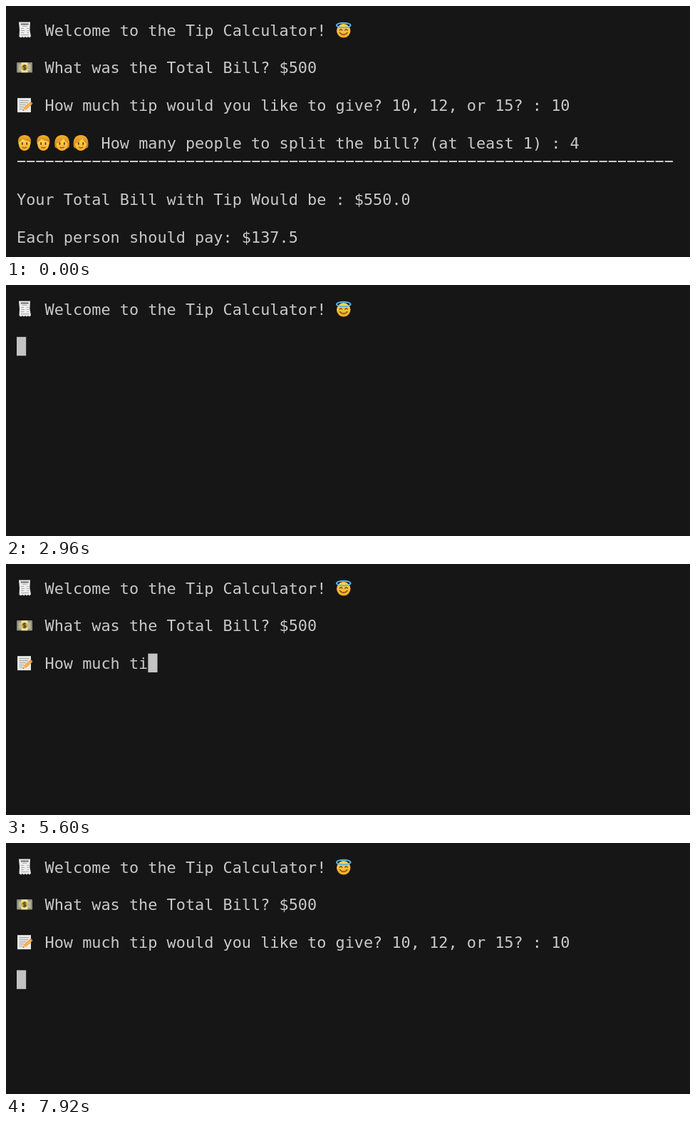
Write an HTML page that moves like this. It is 960 px wide and 352 px high and loops after 8 s.

```html
<!DOCTYPE html>
<html lang="en">
<head>
<meta charset="utf-8">
<title>Tip Calculator</title>
<style>
  html, body { margin: 0; width: 100%; height: 100%; overflow: hidden; background: #161616; }
  svg { display: block; width: 100%; height: 100%; }
  text {
    font: 21.875px "DejaVu Sans Mono", monospace;
    fill: #c9c9c9;
    white-space: pre;
  }
</style>
</head>
<body>
<svg id="stage" viewBox="0 0 960 352" xmlns="http://www.w3.org/2000/svg">
  <defs>
    <linearGradient id="skin" x2="0" y2="1">
      <stop offset="0" stop-color="#ffdc55"/><stop offset="1" stop-color="#f5a623"/>
    </linearGradient>
    <linearGradient id="hair" x2="0" y2="1">
      <stop offset="0" stop-color="#f3b02c"/><stop offset="1" stop-color="#c87a17"/>
    </linearGradient>

    <g id="receipt">
      <path d="M3 0H19L18.4 11 20 20 18 22 16 20.5 14 22 12 20.5 10 22 8 20.5 6 22 3.5 20.5 4 11Z" fill="#ececec"/>
      <path d="M6 3H16.500" stroke="#444" stroke-width="2.200" stroke-dasharray="1.200 .4"/>
      <path d="M8 5.800H14.500M6 9H10M14.500 9H17M6 12H11M14.500 12H17M6 15H10M14.500 15H17M6 18H17" stroke="#aaa"/>
    </g>

    <g id="money">
      <rect x=".3" y="4" width="21.500" height="14" rx=".6" fill="#b9b79b"/>
      <rect x="1.700" y="5.500" width="18.700" height="11" fill="none" stroke="#7d7e66"/>
      <rect x="6.500" y="4" width="9" height="14" fill="#f5e29a"/>
      <circle cx="11" cy="11" r="4.300" fill="#c9a63c"/>
      <path d="M13 9C12 7.800 9 8 9 9.600 9 11.500 13 10.600 13 12.500 13 14 10 14.200 9 13M11 7V15" fill="none" stroke="#4b431f" stroke-width="1.100"/>
    </g>

    <g id="memo">
      <path d="M1 1H20V21H1Z" fill="#e9e9e7"/>
      <path d="M3.500 4.500H17M3.500 7.500H16M3.500 10.500H13M3.500 13.500H10M3.500 16.500H8" stroke="#aaa" stroke-width="1.100"/>
      <path d="M8.500 18.700 10 14.500 18.500 7 21.500 10 13 17.500Z" fill="#f2a02c"/>
      <path d="M11.500 16 20 8.500" stroke="#ffc95c" stroke-width="1.200"/>
      <path d="M18.500 7 20 5.700 22.500 8.700 21.500 10Z" fill="#e2766f"/>
      <path d="M8.500 18.700 10 14.500 13 17.500Z" fill="#e9c596"/>
      <path d="M8.500 18.700 9 17.200 10.200 18.200Z" fill="#333"/>
    </g>

    <g id="angel">
      <circle cx="11" cy="12.300" r="9.700" fill="url(#skin)"/>
      <ellipse cx="11" cy="4.500" rx="9.800" ry="3.300" fill="none" stroke="#58b4e6" stroke-width="2"/>
      <path d="M5.500 11.500Q7.300 9 9 11.500M13 11.500Q14.800 9 16.500 11.500M5.800 15Q11 20.500 16.200 15" fill="none" stroke="#74401b" stroke-width="1.400" stroke-linecap="round"/>
    </g>

    <g id="features">
      <path d="M7.800 11V13M14.200 11V13" stroke="#59351a" stroke-width="1.700" stroke-linecap="round"/>
      <path d="M8 16.800Q11 19 14 16.800" fill="none" stroke="#9b4b20" stroke-width="1.300"/>
    </g>
    <g id="boy">
      <path d="M2.500 13C0 3 6 0 11 0S22 3 19.500 13Z" fill="url(#hair)"/>
      <path d="M3 10C6 9 7 7 8 5.500 11 8 16 8 19 10 20 17 16 22 11 22S2 17 3 10Z" fill="url(#skin)"/>
      <use href="#features"/>
    </g>
    <g id="girl">
      <path d="M1 17C-1 5 4 0 11 0S23 5 21 17Q18 20 11 20T1 17Z" fill="url(#hair)"/>
      <path d="M3 12C7 11 11 8 13 5 14 8 17 10 19 12 19 18 16 22 11 22S3 18 3 12Z" fill="url(#skin)"/>
      <use href="#features"/>
    </g>
  </defs>

  <rect width="960" height="352" fill="#161616"/>
  <g id="lines"></g>
  <g id="result">
    <path d="M16 218H937" stroke="#c9c9c9" stroke-width="2" stroke-dasharray="11.200 1.970"/>
  </g>
  <rect id="cursor" width="13.170" height="26.400" fill="#c3c3c3"/>
</svg>

<script>
const LOOP = 8000, TICK = 80;
const CHAR_MS = 43.6;
const CLEAR_AT = 1380;
const CELL_W = 13.17, CELL_H = 26.4, LEFT = 15, TOP = 20;

const lines = [
  { row: 0, start: CLEAR_AT, icons: ["receipt"], prompt: "Welcome to the Tip Calculator! ", tail: "angel" },
  { row: 2, start: 2950, icons: ["money"], prompt: "What was the Total Bill? $", answer: "500", keys: [4400, 4560, 4720] },
  { row: 4, start: 5003, icons: ["memo"], prompt: "How much tip would you like to give? 10, 12, or 15? : ", answer: "10", keys: [7680, 7760] },
  { row: 6, start: 7915, icons: ["boy", "boy", "girl", "girl"], prompt: "How many people to split the bill? (at least 1) : ", answer: "4" },
];

const $ = id => document.getElementById(id);
const colX = col => LEFT + col * CELL_W;
const rowY = row => TOP + row * CELL_H;
const show = (node, on) => node.setAttribute("visibility", on ? "visible" : "hidden");

function add(parent, tag, attrs) {
  const node = document.createElementNS("http://www.w3.org/2000/svg", tag);
  for (const key in attrs) node.setAttribute(key, attrs[key]);
  return parent.appendChild(node);
}
const addIcon = (name, col, row) =>
  add($("lines"), "use", { href: "#" + name, x: colX(col), y: rowY(row) + 2.5 });
const addText = (parent, col, row) =>
  add(parent, "text", { x: colX(col), y: rowY(row) + 21.5 });

for (const line of lines) {
  line.answer ??= "";
  line.keys ??= [];
  const textCol = line.icons.length * 2 + 1;
  line.iconNodes = line.icons.map((name, i) => addIcon(name, i * 2, line.row));
  line.textNode = addText($("lines"), textCol, line.row);
  if (line.tail) line.tailNode = addIcon(line.tail, textCol + line.prompt.length, line.row);
  line.size = line.icons.length + 1 + line.prompt.length + (line.tail ? 1 : 0);
}
addText($("result"), 0, 9).textContent = "Your Total Bill with Tip Would be : $550.0";
addText($("result"), 0, 11).textContent = "Each person should pay: $137.5";

// Shows the first count characters and returns the column after them.
function drawLine(line, count) {
  const iconCount = line.icons.length;
  const hasTail = line.tail && count >= line.size;
  line.iconNodes.forEach((node, i) => show(node, count > i));
  line.textNode.textContent = (line.prompt + line.answer).slice(0, Math.max(0, count - iconCount - 1));
  if (line.tail) show(line.tailNode, hasTail);
  return count + Math.min(count, iconCount) + (hasTail ? 1 : 0);
}

function typedCount(line, time) {
  const printed = Math.floor((time - line.start) / CHAR_MS);
  const entered = line.keys.filter(key => time >= key).length;
  return Math.max(0, Math.min(line.size, printed)) + entered;
}

function draw(now) {
  const time = Math.floor((now % LOOP) / TICK) * TICK;
  const finished = time < CLEAR_AT;
  show($("result"), finished);
  show($("cursor"), !finished);
  for (const line of lines) {
    const count = finished ? line.size + line.answer.length : typedCount(line, time);
    const col = drawLine(line, count);
    if (time >= line.start) {
      $("cursor").setAttribute("x", colX(col));
      $("cursor").setAttribute("y", rowY(line.row));
    }
  }
}

function frame() {
  draw(performance.now());
  requestAnimationFrame(frame);
}
frame();
</script>
</body>
</html>
```
